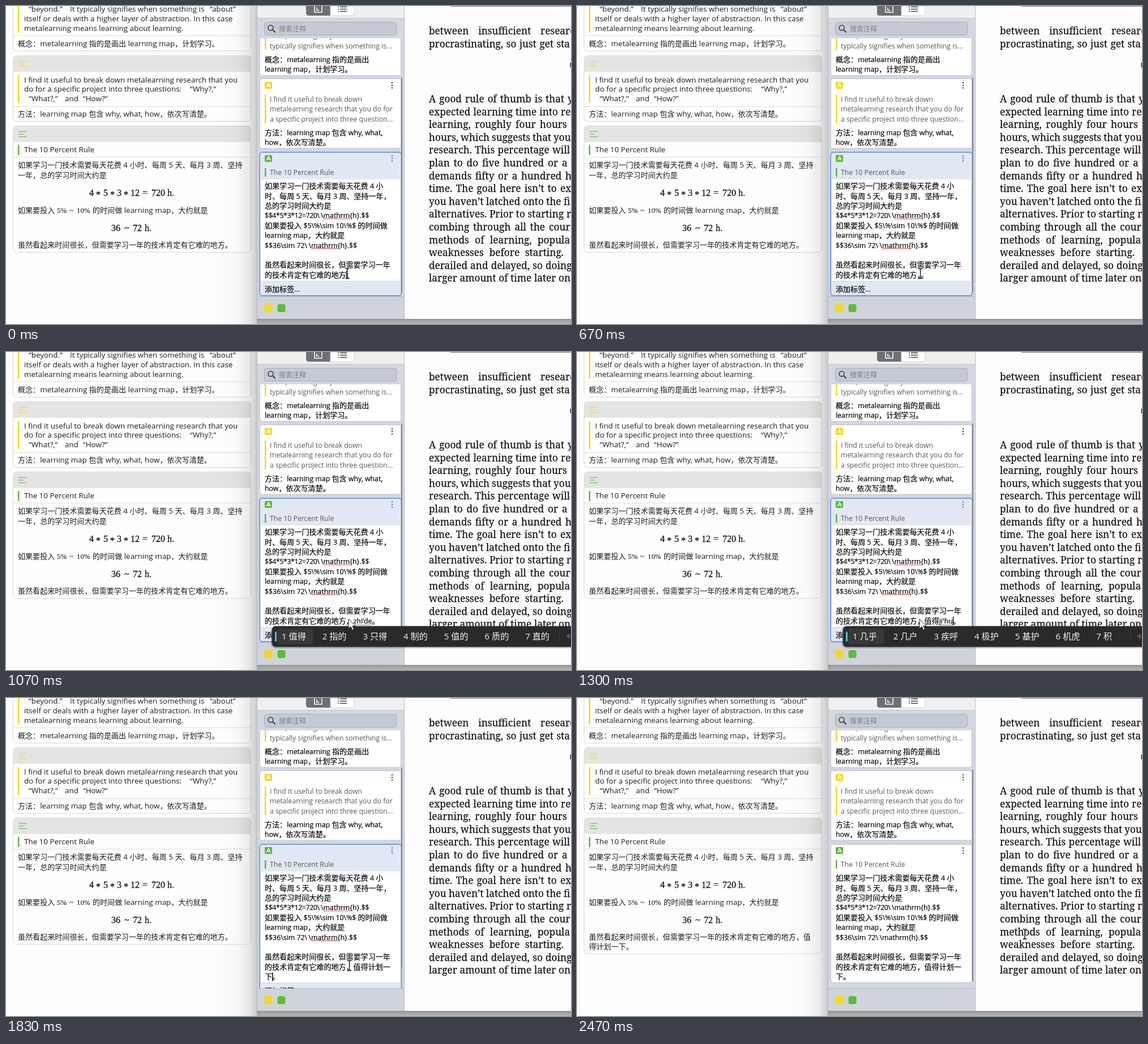
An HTML page that plays this animation: 998 px wide and 561 px high, repeating every 2.51 s.

```html
<!DOCTYPE html>
<html lang="zh">
<head>
<meta charset="utf-8">
<title>Notes</title>
<style>
html, body { margin: 0; width: 100%; height: 100%; overflow: hidden; background: #fdfdfd; }
svg { display: block; width: 998px; height: 561px; }
text { white-space: pre; font-family: "Noto Sans CJK SC", "Noto Sans CJK", sans-serif; }
.lat { font-family: "Open Sans", "Noto Sans", sans-serif; }
.book { font: 17.25px "Noto Serif", Georgia, serif; fill: #161616; stroke: #161616; stroke-width: .25px; }
.note { stroke: #080808; stroke-width: .22px; }
.math { font-family: "Liberation Serif", serif; fill: #222; stroke: #222; }
</style>
</head>
<body>
<svg id="stage" viewBox="0 0 998 561" xmlns="http://www.w3.org/2000/svg"></svg>
<script>
const LOOP = 2510, BLUR = 2270;
const YELLOW = '#f5d90f', GREEN = '#55bb30', INK = '#1c1c1c', GREY = '#55575b';
const stage = document.getElementById('stage');

// Chinese and Latin runs have their own font and size
const mix = (str, cjk, lat) => str.replace(/[\x20-\x7e“”’]+|[^\x20-\x7e“”’]+/g, run =>
  /[\x20-\x7e“”’]/.test(run[0])
    ? `<tspan class="lat" font-size="${lat}">${run}</tspan>`
    : `<tspan font-size="${cjk}">${run}</tspan>`);
const label = (x, y, str, cjk, lat, fill = INK, extra = '') =>
  `<text x="${x}" y="${y}" fill="${fill}" ${extra}>${mix(str, cjk, lat)}</text>`;
const left = (x, y, str) => label(x, y, str, 13.07, 13.4);
const mid = (y, str, x = 457, extra = '') => label(x, y, str, 13.06, 12.35, '#080808', 'class="note" ' + extra);
const quote = (y, str) => label(466, y, str, 13, 12.25, GREY);
const math = (y, size, weight, parts) => parts.map(([x, s]) =>
  `<text class="math" x="${x}" y="${s === '*' ? y + 3 : y}" font-size="${size}" stroke-width="${weight}">${s}</text>`).join('');
const rect = (x, y, w, h, fill, extra = '') =>
  `<rect x="${x}" y="${y}" width="${w}" height="${h}" fill="${fill}" ${extra}/>`;
const path = (d, stroke, width, extra = '') =>
  `<path d="${d}" fill="none" stroke="${stroke}" stroke-width="${width}" ${extra}/>`;

function leftCard(y, h, color, id = '') {
  const head = `M12.5 ${y + 29}V${y + 6}q0-5.5 5.5-5.5H427q5.5 0 5.5 5.5V${y + 29}z`;
  return rect(12.5, y + .5, 420, h, '#fefefe', `rx="6" stroke="#d8d8d8" ${id}`) +
    `<path d="${head}" fill="#e4e4e3"/>` +
    path(`M22 ${y + 10.5}h15M22 ${y + 15}h10M22 ${y + 19.5}h15`, color, 1.4, 'opacity=".65"');
}
const rule = y => path(`M13 ${y}H432`, '#dedede', 1);

function leftPane() {
  return rect(0, 0, 998, 561, '#fdfdfd') +
    rect(12.5, -20, 420, 99.5, '#fefefe', 'rx="6" stroke="#d8d8d8"') +
    rect(21, 0, 2.5, 47, YELLOW) +
    left(40, 10, '“beyond.”') + left(113, 10, 'It typically signifies when something is') + left(360, 10, '“about”') +
    left(32, 27, 'itself or deals with a higher layer of abstraction. In this case') +
    left(32, 44, 'metalearning means learning about learning.') +
    rule(52.5) + left(21, 70.5, '概念：metalearning 指的是画出 learning map，计划学习。') +
    leftCard(87, 116, YELLOW) + rect(21, 122, 2.5, 49, YELLOW) +
    left(32, 134.5, 'I find it useful to break down metalearning research that you') +
    left(32, 151.3, 'do for a specific project into three questions:') + left(325, 151.3, '“Why?,”') +
    left(40, 168, '“What?,”') + left(104, 168, 'and') + left(136, 168, '“How?”') +
    rule(177.5) + left(21, 195, '方法：learning map 包含 why, what, how，依次写清楚。') +
    leftCard(211, 223, GREEN, 'id="lcard"') + rect(21, 245, 2.5, 18, GREEN) +
    left(32, 258.3, 'The 10 Percent Rule') + rule(266.5) +
    left(21, 285, '如果学习一门技术需要每天花费 4 小时、每周 5 天、每月 3 周、坚持') +
    left(21, 302.5, '一年，总的学习时间大约是') +
    math(334.5, 16, .4, [[147, '4'], [159, '*'], [172, '5'], [184, '*'], [196, '3'], [208, '*'],
      [220, '12'], [241, '='], [257, '720'], [285, 'h.']]) +
    left(21, 364.5, '如果要投入') + math(364.5, 12.8, .15, [[90, '5%'], [112, '~'], [125, '10%']]) +
    left(153, 364.5, '的时间做 learning map，大约就是') +
    math(396.5, 16, .4, [[186, '36'], [209, '~'], [224, '72'], [245, 'h.']]) +
    '<g id="ltail"></g>' +
    rect(370, 0, 73, 561, 'url(#shade)');
}

const badge = (y, color) => rect(457, y, 13, 12, color, 'rx="1.5"') +
  path(`M460.3 ${y + 9.5}l3.2-7h.6l3.2 7M461.5 ${y + 7.2}h4.6`, '#fff', 1.4);
const dots = (y, extra = '') => `<g ${extra}>` + [0, 4.5, 9].map(d =>
  `<circle cx="682" cy="${y + d}" r="1.25"/>`).join('') + '</g>';
const card = (y, h, id = '') => rect(448.5, y, 249, h, '#fff', `rx="4" stroke="#c0c6d1" ${id}`);
function wavy(x, y, w) {
  let d = `M${x} ${y}`;
  for (let i = 0; i < w / 2; i++) d += `l2 ${i % 2 ? -2 : 2}`;
  return path(d, '#d9343c', 1);
}

function sidebar() {
  return rect(443, 552, 555, 9, 'url(#under)') + rect(443, 0, 260, 552, '#d2d7e0') +
    rect(443, 0, 260, 21, '#efefee') + path('M443 21.5H703', '#c3c6cc', 1) +
    '<path d="M530 0h43v17h-38q-5 0-5-5z" fill="#6e6f73"/>' +
    '<path d="M573 0h42v12q0 5-5 5h-37z" fill="#fdfdfd" stroke="#d6d6d6"/>' +
    path('M545 0v11h13V0M549 3v4.5h4', '#fff', 1.5) +
    path('M586 1.5h2M590 1.5h12M586 5.5h2M590 5.5h12M586 9.5h2M590 9.5h12', '#444', 1.5) +
    rect(456.5, 28.5, 233, 23, '#c3c9d5', 'rx="4" stroke="#a7adba"') +
    '<circle cx="467.5" cy="38.5" r="4.5" fill="none" stroke="#33363c" stroke-width="1.5"/>' +
    path('M471 42l4.5 4.5', '#33363c', 1.8) + label(482, 45, '搜索注释', 12, 12, '#7c818b') +
    '<g clip-path="url(#list)">' +
    card(40, 82.5) + rect(457, 57, 2.5, 20, YELLOW) +
    quote(57, 'term, meaning “beyond.” It') + quote(74.5, 'typically signifies when something is...') +
    mid(98.5, '概念：metalearning 指的是画出') + mid(116, 'learning map，计划学习。') +
    card(128.5, 122.5) + badge(134, YELLOW) + dots(135.5, 'fill="#444"') +
    rect(457, 156, 2.5, 51, YELLOW) + quote(168.7, 'I find it useful to break down') +
    quote(186.2, 'metalearning research that you do for') + quote(203.7, 'a specific project into three question...') +
    mid(228, '方法：learning map 包含 why, what,') + mid(245.3, 'how，依次写清楚。') +
    card(258.5, 243.5, 'id="plain"') +
    '<g id="active">' + rect(448, 258, 250.5, 253, '#e2e8f3', 'rx="5" stroke="#7d9cd8" stroke-width="2" id="frame"') +
    rect(450, 306, 246, 179, '#fff', 'id="field"') +
    '<g id="tags">' + path('M450 485.5H696', '#cdd6e4', 1) + mid(503.5, '添加标签...') + '</g>' +
    wavy(561, 374.5, 47) + wavy(539, 427, 48) + '</g>' +
    badge(263, GREEN) + dots(264.5, 'id="dots"') + rect(457, 286, 2.5, 15, GREEN) + quote(298, 'The 10 Percent Rule') +
    mid(322, '如果学习一门技术需要每天花费 4 小') + mid(339.5, '时、每周 5 天、每月 3 周、坚持一年，') +
    mid(357, '总的学习时间大约是') +
    mid(374.2, '$$4*5*3*12=720\\', 457, 'letter-spacing="-.4"') + mid(374.2, '\\mathrm{h}.$$', 556) +
    mid(391.5, '如果要投入 $5\\%\\sim 10\\%$ 的时间做') + mid(409, 'learning map，大约就是') +
    mid(426.5, '$$36\\sim 72\\') + mid(426.5, '\\mathrm{h}.$$', 534.5) +
    mid(461.3, '虽然看起来时间很长，但需要学习一年') +
    mid(478.8, '', 457, 'id="row1"') + mid(496.3, '', 457, 'id="row2"') +
    path('', '#222', 1, 'id="under1" stroke-dasharray="1.5 1"') + rect(0, 0, 1.5, 15, '#000', 'id="caret"') +
    '</g>' + rect(698, 126, 2, 380, '#7e8491', 'rx="1" id="bar"') +
    rect(443, 512, 260, 40, '#cfd3db') + path('M443 512.5H703', '#b2b7c1', 1) +
    rect(456.5, 526, 14, 14, '#f7d90e', 'rx="3.5"') + rect(479.5, 526, 14, 14, '#5abf33', 'rx="3.5"') +
    path('M443.5 0V552', '#b4b8c0', 1);
}

// Each line: start of the last visible word, then the text
const LINES = [
  [944, 'between insufficient researc'], [972.5, 'procrastinating, so just get sta'],
  [992, 'A good rule of thumb is that y'], [980, 'expected learning time into re'],
  [943, 'learning, roughly four hours'], [967, 'hours, which suggests that you'],
  [965, 'research. This percentage will'], [982, 'plan to do five hundred or a'],
  [988, 'demands fifty or a hundred h'], [979, 'time. The goal here isn’t to ex'],
  [985, 'you haven’t latched onto the fi'], [990, 'alternatives. Prior to starting r'],
  [959, 'combing through all the cour'], [939, 'methods of learning, popula'],
  [917, 'weaknesses before starting.'], [953, 'derailed and delayed, so doing'],
  [976, 'larger amount of time later on']
];
function page() {
  return rect(703, 0, 295, 552, '#fdfdfd') + path('M703.5 0V552', '#b9bcc2', 1) +
    path('M443 552.5H998', '#8f8f8f', 1) + rect(785, 0, 213, 1, '#77756a') + rect(996.5, 100, 1.5, 8, '#333') +
    LINES.map(([, s], i) =>
      `<text class="book" x="747" y="${i < 2 ? 50 + 22.5 * i : 170 + 22.6 * (i - 2)}">${s}</text>`).join('');
}
function justify() {
  stage.querySelectorAll('.book').forEach((line, i) => {
    const [lastX, s] = LINES[i], at = s.lastIndexOf(' ') + 1;
    const gap = (lastX - line.getStartPositionOfChar(at).x) / (s.split(' ').length - 1);
    line.style.wordSpacing = gap + 'px';
  });
}

const BEAM = 'M-3.5-9q3 0 3.5 2q.5-2 3.5-2M0-7V7M-3.5 9q3 0 3.5-2q.5 2 3.5 2';
stage.innerHTML = `<defs>
  <linearGradient id="shade"><stop offset="0" stop-opacity="0"/><stop offset=".5" stop-opacity=".02"/>
    <stop offset=".8" stop-opacity=".08"/><stop offset="1" stop-opacity=".2"/></linearGradient>
  <linearGradient id="under" x2="0" y2="1"><stop stop-color="#979797"/><stop offset="1" stop-color="#b4b4b4"/></linearGradient>
  <clipPath id="list"><rect x="444" y="57" width="258" height="455"/></clipPath></defs>` +
  leftPane() + sidebar() + page() + '<g id="ime"></g>' +
  '<g id="beam">' + path(BEAM, '#fff', 3, 'opacity=".7"') + path(BEAM, '#111', 1.4) + '</g>' +
  '<path id="arrow" d="M0 0V17l4-3.7 2.7 6.2 2.8-1.2-2.7-6H12z" fill="#fff" stroke="#222"/>';
justify();

const el = {};
stage.querySelectorAll('[id]').forEach(n => el[n.id] = n);
const set = (n, attrs) => { for (const k in attrs) n.setAttribute(k, attrs[k]); };
const show = (n, on) => n.style.display = on ? '' : 'none';

// Time, committed text, pinyin being typed, candidates
const TAIL = '计划 激化 极化 吉华 吉化 际华';
const STEPS = [
  [0, '', ''], [130, '，', ''],
  [740, '，', 'z', '在 这 中 主 真 正 再'],
  [800, '，', 'zh', '这 中 主 真 正 只 着'],
  [860, '，', 'zhi', '只 之 至 指 值 知 直'],
  [930, '，', "zhi'd", '知道 指导 指定 制度 直到 值得 只'],
  [1000, '，', "zhi'de", '值得 指的 只得 制的 值的 质的 直的'],
  [1110, '，值得', ''],
  [1150, '，值得', 'j', '就 将 见 级 进 及 几'],
  [1190, '，值得', 'ji', '及 几 级 机 即 记 极'],
  [1230, '，值得', "ji'h", '计划 几乎 机会 集合 激活 极化 几号'],
  [1280, '，值得', "ji'hu", '几乎 几户 疾呼 极护 基护 机虎 积'],
  [1340, '，值得', "ji'hua", TAIL + ' 积'],
  [1390, '，值得\n', "ji'hua'y", '计划与 ' + TAIL],
  [1440, '，值得\n', "ji'hua'yi", '计划以 ' + TAIL],
  [1520, '，值得\n', "ji'hua'yi'x", '计划一下 ' + TAIL],
  [1570, '，值得\n', "ji'hua'yi'xi", '计划一系 ' + TAIL],
  [1620, '，值得\n', "ji'hua'yi'xia", '计划一下 ' + TAIL],
  [1690, '，值得计划一\n下', '']
];

function imeBar(list, top) {
  const words = list.split(' '), extra = w => 12.6 * (w.length - 2);
  const x0 = 470 - Math.max(0, extra(words[0]));
  let x = x0 + 17;
  let out = rect(x0 - 2, top - 1, 600, 40, '#000', 'rx="8" opacity=".18"') +
    rect(x0, top, 600, 36, '#2a2a2b', 'rx="6" stroke="#3d3d3e"') +
    rect(x0 + 9, top + 4, 63 + extra(words[0]), 28, '#383839', 'rx="4"') +
    rect(x0 + 5, top + 9, 3, 18, '#3fc3ee', 'rx="1.5"');
  words.forEach((w, i) => {
    out += label(x, top + 23.2, i + 1 + ' ' + w, 15.2, 15, '#f2f2f2');
    x += 71.7 + extra(w);
  });
  return out + path(`M977.5 ${top + 7}v22`, '#3c3c3d', 1) +
    `<path d="M996 ${top + 13}v9l-7-4.5z" fill="#5a5a5b"/>`;
}

let lastKey = '';
function applyStep(i, blurred) {
  const [, text, typed, list] = STEPS[i];
  const [one, two] = text.split('\n'), wrap = two !== undefined;
  const row = wrap ? el.row2 : el.row1, base = wrap ? two : '的技术肯定有它难的地方' + one;
  const size = s => mix(s, 13.06, 12.35);
  el.row1.innerHTML = size('的技术肯定有它难的地方' + one);
  el.row2.innerHTML = '';
  const measure = s => { row.innerHTML = size(s); return s ? row.getComputedTextLength() : 0; };
  const from = 457 + measure(base), to = 457 + measure(base + typed);
  row.innerHTML = size(base + typed + '。');
  const y = wrap ? 496.3 : 478.8;
  set(el.under1, { d: typed ? `M${from} ${y + 2.7}H${to}` : '' });
  set(el.caret, { x: to, y: y - 12 });

  show(el.active, !blurred);
  show(el.plain, blurred);
  set(el.dots, { fill: blurred ? '#444' : '#4f7cc4' });
  set(el.frame, { height: wrap ? 270.5 : 253 });
  set(el.field, { height: wrap ? 196.5 : 179 });
  set(el.tags, { transform: `translate(0 ${wrap ? 17.5 : 0})` });
  set(el.bar, wrap && !blurred ? { y: 123, height: 352 } : { y: 126, height: blurred ? 374 : 380 });
  set(el.lcard, { height: blurred ? 239.5 : 223 });
  const tail = '虽然看起来时间很长，但需要学习一年的技术肯定有它难的地方';
  el.ltail.innerHTML = blurred
    ? left(21, 425.5, tail + '，值') + left(21, 442.5, '得计划一下。')
    : left(21, 425.5, tail + '。');
  el.ime.innerHTML = list ? imeBar(list, wrap ? 501 : 484) : '';
  show(el.arrow, list && !wrap);
  show(el.beam, !(list && !wrap));
}

const ease = (t, a, b) => {
  const u = Math.min(1, Math.max(0, (t - a) / (b - a)));
  return u * u * (3 - 2 * u);
};
function draw(t) {
  let i = STEPS.length - 1;
  while (STEPS[i][0] > t) i--;
  const blurred = t >= BLUR, key = i + '/' + blurred;
  if (key !== lastKey) applyStep(i, blurred);
  lastKey = key;
  const idle = t - STEPS[i][0], quiet = STEPS[i][2] === "zhi'de";
  show(el.caret, !blurred && !quiet && idle % 1000 < 500);
  const go = ease(t, 1930, 2220);
  const x = 603 + 3.5 * ease(t, 150, 500) + 184.5 * go, y = 472 - 55.5 * go;
  set(el.beam, { transform: `translate(${x} ${y})` });
  set(el.arrow, { transform: `translate(${x - 1.5} ${y - 1})` });
}

const start = performance.now();
function tick() {
  draw((performance.now() - start) % LOOP);
  requestAnimationFrame(tick);
}
draw(0);
requestAnimationFrame(tick);
</script>
</body>
</html>
```
